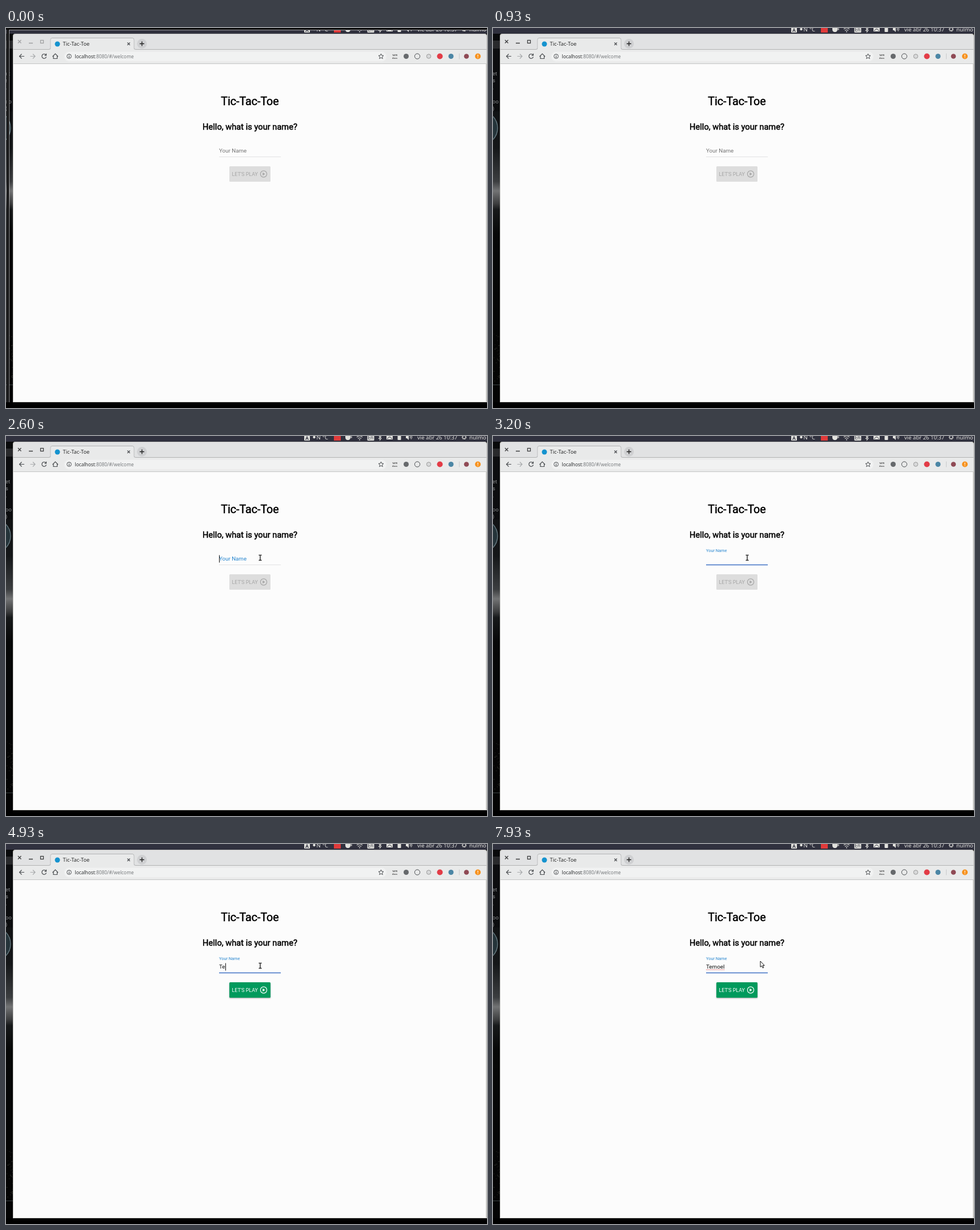
An HTML page that plays this animation: 842 by 665 pixels, repeating every 8000 ms.

```html
<!DOCTYPE html>
<html lang="en">
<head>
<meta charset="utf-8">
<title>Tic-Tac-Toe</title>
<style>
  html, body { margin: 0; width: 100%; height: 100%; overflow: hidden; background: #000; }
  svg { display: block; width: 100%; height: 100%; }
  text { font-family: Roboto, sans-serif; white-space: pre; }
  .ui, .ui text { font-family: "Noto Sans", sans-serif; }
  .mono { font: 9.5px "DejaVu Sans Mono", monospace; fill: #85888a; }
  .heading { text-anchor: middle; stroke: #000; stroke-width: .5; }
  .line { fill: none; stroke: #4a4d50; stroke-width: 1.2; }
  .tray { fill: none; stroke: #d8d8d4; stroke-width: 1.1; }
</style>
</head>
<body>
<svg viewBox="0 0 842 665">
  <defs>
    <linearGradient id="sky" x1="0" y1="0" x2="0" y2="1">
      <stop offset="0" stop-color="#08090a"/>
      <stop offset=".32" stop-color="#151719"/>
      <stop offset=".41" stop-color="#3c3e40"/>
      <stop offset=".435" stop-color="#737475"/>
      <stop offset=".47" stop-color="#3b3c3d"/>
      <stop offset=".485" stop-color="#17191a"/>
      <stop offset=".55" stop-color="#070808"/>
      <stop offset="1" stop-color="#040404"/>
    </linearGradient>
    <filter id="shadow" x="-10%" y="-20%" width="120%" height="160%">
      <feDropShadow dx="0" dy="1" stdDeviation="1" flood-opacity=".35"/>
    </filter>
  </defs>

  <!-- desktop -->
  <rect width="842" height="665" fill="#000"/>
  <rect width="12" height="655" fill="url(#sky)"/>
  <rect y="22" width="12" height="14" fill="#292a2c"/>
  <rect y="36" width="12" height="110" fill="#0c0d0f"/>
  <circle cx="-22" cy="175" r="30" fill="#25343a" stroke="#6b7f86" stroke-width="1.3"/>
  <g class="mono">
    <text x="-1" y="83">et</text><text x="-1" y="95">s</text><text x="-1" y="107">,</text>
    <text x="-1" y="132">oo</text><text x="-1" y="144">)</text>
  </g>
  <g id="grass" fill="#34352f"></g>
  <path d="M0 624.5H12" stroke="#3a4243"/>

  <!-- system panel -->
  <rect width="842" height="10" fill="#30313e"/>
  <g class="ui" font-size="9.5" fill="#e2e2de">
    <rect x="522" y="-4" width="10" height="12" rx="1"/>
    <text x="524" y="6.5" font-size="8.5" font-weight="bold" fill="#30313e">A</text>
    <circle cx="539.5" cy="2" r="2.2"/>
    <text x="543.5" y="5.5">N</text>
    <text x="554" y="5.5">°C</text>
    <rect x="574" y="-3" width="12" height="11" fill="#e03a3a"/>
    <path d="M594 0h9v2q0 4-3 5h-3q-3-1-3-5z"/>
    <path class="tray" d="M603 1h2v2h-2M614 2q5-4 10 0M616 4.5q3-2.5 6 0"/>
    <circle cx="619" cy="6.5" r="1"/>
    <rect x="632.5" y="-4" width="12" height="12" rx="1"/>
    <text x="633.5" y="6" font-size="8" fill="#30313e">En</text>
    <path class="tray" d="M652 5l5-5M652-1l5 5-2.5 3V-2"/>
    <rect x="666" y="-2" width="11" height="8"/>
    <path d="M667 5l3.5-3h2l3.5 3" fill="none" stroke="#30313e"/>
    <rect x="685.5" y="-3" width="6" height="10" rx="1"/>
    <path d="M700 0h2l3-3v10l-3-3h-2z"/>
    <path class="tray" d="M707 0q2 2 0 4M709-1q3 3 0 6.500"/>
    <text x="720" y="6">vie abr 26 10:37</text>
    <circle class="tray" cx="802" cy="2" r="3" stroke-dasharray="2 .6" style="stroke-width:2.2"/>
    <text x="811" y="6" font-size="9.8">nulmo</text>
  </g>

  <!-- browser window -->
  <path d="M12 655V14q0-4 4-4H838q4 0 4 4V655z" fill="#c9c9c6"/>
  <path d="M13 38V15q0-4 4-4H837q4 0 4 4V38z" fill="#e1e2e3"/>
  <rect x="13" y="38" width="828" height="24" fill="#e9eaea"/>
  <path d="M13 37.500H75q3 0 3-3V20.500q0-3 3-3H221q3 0 3 3V34.500q0 3 3 3H841" fill="none" stroke="#b2b3b4"/>
  <path d="M78 38q.5-1 .5-3V21q0-3 3-3H220q3.500 0 3.500 3V35q0 2 .5 3z" fill="#e9eaea"/>
  <rect x="102" y="41.500" width="564" height="17" rx="8.500" fill="#f1f2f2"/>
  <rect x="13" y="62" width="827" height="592" fill="#fcfcfc"/>
  <path d="M13 62.500H840" stroke="#c4c5c5"/>

  <g id="controls" fill="none" stroke-width="1.3">
    <path d="M21 21l5.500 5.500M26.500 21l-5.500 5.500M40 26.500h7"/>
    <rect x="60.500" y="21.500" width="5" height="5"/>
  </g>
  <g class="ui">
    <circle cx="90" cy="28" r="4.500" fill="#1593cf"/>
    <text x="99.500" y="31.300" font-size="9.300" fill="#2c2d2e">Tic-Tac-Toe</text>
    <path class="line" d="M212.500 25.500l4.500 4.500M217 25.500l-4.500 4.500"/>
    <circle cx="238" cy="27.500" r="8.500" fill="#cfd0d2"/>
    <path d="M234 27.500h8M238 23.500v8" stroke="#222" stroke-width="1.400"/>

    <path class="line" d="M32 49.500h-8.500M27.500 45.500l-4 4 4 4"/>
    <path class="line" d="M42.500 49.500h8.500M47 45.500l4 4-4 4" style="stroke:#a9abad"/>
    <path class="line" d="M70 47.200a3.900 3.900 0 1 0 .5 3.300M70.500 44.800v3h-3"/>
    <path class="line" d="M81.500 50l4.800-4.800 4.800 4.800M83 49v4.500h6.600V49"/>
    <circle class="line" cx="110.500" cy="49.500" r="3.800" style="stroke-width:1"/>
    <path class="line" d="M110.500 47v1M110.500 49v3"/>
    <text x="120.500" y="52.500" font-size="8.350" fill="#2f3133">localhost<tspan fill="#777a7d">:8080/#/welcome</tspan></text>

    <path class="line" style="stroke-width:1" d="M656.500 45l1.300 3 3.200.3-2.500 2.100.8 3.200-2.800-1.700-2.800 1.700.8-3.200-2.500-2.100 3.200-.3z"/>
    <text x="676" y="49" font-size="4" font-weight="bold" fill="#444">1470</text>
    <text x="676" y="53.500" font-size="4" font-weight="bold" fill="#444">docs</text>
    <circle cx="700.500" cy="49.500" r="4.500" fill="#66696c"/>
    <circle class="line" cx="720" cy="49.500" r="4.600" style="stroke-width:1"/>
    <circle cx="740" cy="49.500" r="3.700" fill="#d8d9da" stroke="#999"/>
    <circle cx="759.500" cy="49.500" r="5" fill="#e23c47"/>
    <circle cx="779" cy="49.500" r="4.500" fill="#4b86a5"/>
    <path d="M793.500 44.500v10" stroke="#c9cacb"/>
    <circle cx="806" cy="49.500" r="4.300" fill="#8f4a55"/>
    <circle cx="826" cy="49.500" r="5" fill="#f7921e"/>
    <path d="M826 46.500v3.700M826 51.200v1.200" stroke="#fff" stroke-width="1.100"/>
  </g>

  <!-- page -->
  <text class="heading" x="427" y="135" font-size="19.600">Tic-Tac-Toe</text>
  <text class="heading" x="427" y="178.200" font-size="14.650">Hello, what is your name?</text>
  <path d="M373 225.500H481" stroke="#e2e2e4"/>
  <path id="ink" stroke="#3c70c4" stroke-width="1.400"/>
  <text id="label">Your Name</text>
  <text id="entry" x="373" y="218.200" font-size="9.800" fill="#111"></text>
  <path id="typo" d="M373 220H406" stroke="#e06a6a" stroke-dasharray="1.500 .7"/>
  <path id="caret" stroke="#111"/>
  <rect id="button" x="391" y="242" width="72" height="27" rx="1.500"/>
  <g id="caption">
    <text x="395.500" y="258.700" font-size="8.900">LET'S PLAY</text>
    <circle cx="451" cy="255.500" r="5.600" fill="none" stroke="currentColor" stroke-width="1.200"/>
    <path d="M449.300 252.800v5.400l4.200-2.700z"/>
  </g>

  <path id="arrow" d="M0 0V10.300L2.400 8.200 4.200 12 5.900 11.200 4.200 7.600H7.200z" fill="#fff" stroke="#111"/>
  <path id="beam" d="M-2.500-4.500H-.8L0-4 .8-4.500H2.500M0-4V4M-2.500 4.500H-.8L0 4 .8 4.500H2.500" fill="none" stroke="#222" stroke-width="1.400"/>

  <!-- capture outline, fading out at the start -->
  <g id="outline" fill="none">
    <path d="M0 1.500H842M3.500 655V3" stroke="#0b0b0c" stroke-width="3"/>
    <path d="M842 3.500H5.500V655" stroke="#a2a2a4"/>
    <path d="M1.500 655V3" stroke="#555658"/>
  </g>
</svg>

<script>
const LOOP = 8000;
const FOCUS = 2600, ENABLE = 4400, SPELLCHECK = 7470;
const NAME = "Temoel";
const KEY_TIMES = [4400, 4930, 5400, 5530, 6670, 6870];
// Times at which the caret becomes solid; it then blinks every 600 ms.
const CARET_RESETS = [FOCUS, ...KEY_TIMES.slice(0, 4), 5670, ...KEY_TIMES.slice(4)];
const POINTER = [[1070, 842, 400], [1400, 660, 262], [1800, 540, 204], [1930, 540, 204],
                 [2400, 445, 213], [7470, 445, 213], [7900, 468, 205]];

const $ = id => document.getElementById(id);
const set = (id, attrs) => {
  for (const key in attrs) $(id).setAttribute(key, attrs[key]);
};
const show = (id, on) => set(id, { visibility: on ? "visible" : "hidden" });
const progress = (t, from, to) => Math.min(1, Math.max(0, (t - from) / (to - from)));
const easeOut = p => 1 - (1 - p) ** 3;
const smooth = p => p * p * (3 - 2 * p);
const mix = (a, b, p) => a + (b - a) * p;
const mixColor = (a, b, p) => `rgb(${a.map((v, i) => Math.round(mix(v, b[i], p)))})`;

function drawGrass() {
  let seed = 7;
  const random = () => (seed = seed * 16807 % 2147483647) / 2147483647;
  for (let i = 0; i < 45; i++) {
    const blade = document.createElementNS("http://www.w3.org/2000/svg", "rect");
    const attrs = { x: random() * 11, y: 535 + random() * 85, width: 1 + random() * 2, height: 1, opacity: random() };
    for (const key in attrs) blade.setAttribute(key, attrs[key]);
    $("grass").append(blade);
  }
}

function drawField(t) {
  const float = easeOut(progress(t, FOCUS, 2900));
  const focused = t >= FOCUS;
  set("label", { x: 373, y: mix(218.2, 203, float), "font-size": mix(9.75, 7.4, float),
                 fill: focused ? "#2585cf" : "#747474" });
  const half = 54 * easeOut(progress(t, FOCUS + 30, 2930));
  set("ink", { d: `M${427 - half} 225.500H${427 + half}` });
  show("ink", half > 0);

  $("entry").textContent = NAME.slice(0, KEY_TIMES.filter(k => t >= k).length);
  const reset = CARET_RESETS.filter(k => t >= k).pop();
  const x = 373.5 + Math.round($("entry").getComputedTextLength());
  set("caret", { d: `M${x} 208.500V221.500` });
  show("caret", focused && Math.floor((t - reset) / 600) % 2 === 0);
  show("typo", t >= SPELLCHECK);
}

function drawButton(t) {
  const p = easeOut(progress(t, ENABLE, ENABLE + 450));
  set("button", { fill: mixColor([221, 221, 221], [4, 154, 91], p), filter: p > 0 ? "url(#shadow)" : "none" });
  const color = mixColor([166, 166, 166], [255, 255, 255], p);
  set("caption", { fill: color, color });
}

function drawPointer(t) {
  let i = POINTER.findLastIndex(([time]) => t >= time);
  const [t0, x0, y0] = POINTER[Math.max(i, 0)];
  const [t1, x1, y1] = POINTER[Math.min(Math.max(i, 0) + 1, POINTER.length - 1)];
  const p = t1 > t0 ? smooth(progress(t, t0, t1)) : 0;
  const x = mix(x0, x1, p), y = mix(y0, y1, p);
  const overField = x >= 373 && x <= 481 && y >= 207 && y <= 224;
  const transform = `translate(${x} ${y})`;
  set("arrow", { transform });
  set("beam", { transform });
  show("arrow", i >= 0 && !overField);
  show("beam", i >= 0 && overField);
}

function draw(now) {
  const t = now % LOOP;
  set("outline", { opacity: 1 - progress(t, 70, 470) });
  set("controls", { stroke: t < 270 ? "#a0a1a2" : "#3c3d3e" });
  drawField(t);
  drawButton(t);
  drawPointer(t);
}

drawGrass();
const start = performance.now();
function tick() {
  draw(performance.now() - start);
  requestAnimationFrame(tick);
}
tick();
</script>
</body>
</html>
```
